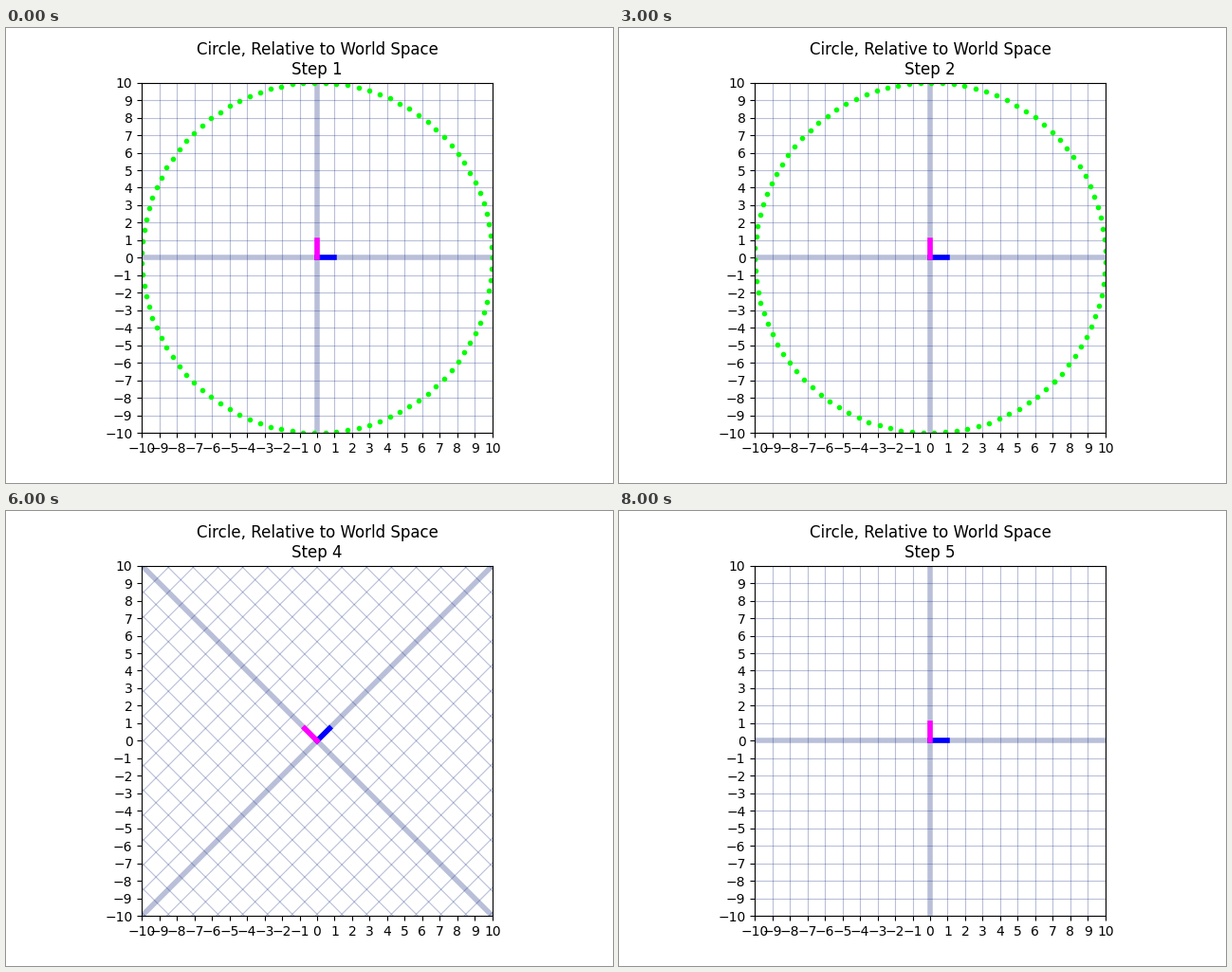
Animation, 640 px wide and 480 px high, one loop 10 s. Source, as a matplotlib script:

```python
import numpy as np
import matplotlib.pyplot as plt
from matplotlib.animation import FuncAnimation

LIMIT = 10
REACH = 30          # half length of the grid lines
COUNT = 15          # grid lines on each side of an axis
GRID = (0.09, 0.18, 0.50)


def rotation(degrees):
    a = np.radians(degrees)
    return np.array([[np.cos(a), -np.sin(a)], [np.sin(a), np.cos(a)]])


WORLD = np.eye(2)
TURN = rotation(-45)
SCALE = np.diag([4.0, 2.0])
TURN_BACK = rotation(45)

# One entry per second: step number, basis on show, map applied to the circle
TIMELINE = (
    [(1, WORLD, WORLD)] * 2
    + [(2, TURN, TURN), (2, WORLD, TURN)]
    + [(3, SCALE, SCALE @ TURN), (3, WORLD, SCALE @ TURN)]
    + [(4, TURN_BACK, TURN_BACK @ SCALE @ TURN),
       (4, WORLD, TURN_BACK @ SCALE @ TURN)]
    + [(5, WORLD, TURN_BACK @ SCALE @ TURN)] * 2
)

angles = np.linspace(0, 2 * np.pi, 100)
circle = LIMIT * np.array([np.cos(angles), np.sin(angles)])

fig, ax = plt.subplots(figsize=(6.4, 4.8), dpi=100)
ax.set_aspect("equal")
ax.set_xlim(-LIMIT, LIMIT)
ax.set_ylim(-LIMIT, LIMIT)
ax.set_xticks(range(-LIMIT, LIMIT + 1))
ax.set_yticks(range(-LIMIT, LIMIT + 1))
title = ax.set_title("Circle, Relative to World Space\nStep 1")

segments = []       # (line, end points in the moving basis)


def add_segment(xs, ys, **style):
    line, = ax.plot(xs, ys, **style)
    segments.append((line, np.array([xs, ys], dtype=float)))


for k in range(-COUNT, COUNT + 1):
    width = 4 if k == 0 else 0.8
    add_segment([k, k], [-REACH, REACH], color=GRID, alpha=0.3, lw=width)
    add_segment([-REACH, REACH], [k, k], color=GRID, alpha=0.3, lw=width)
add_segment([0, 1], [0, 0], color="#0000ff", lw=4)
add_segment([0, 0], [0, 1], color="#ff00ff", lw=4)
dots, = ax.plot(*circle, ".", color="#00ff00", ms=6)


def draw(i):
    step, basis, shape = TIMELINE[i]
    for line, ends in segments:
        line.set_data(*(basis @ ends))
    dots.set_data(*(shape @ circle))
    title.set_text(f"Circle, Relative to World Space\nStep {step}")


anim = FuncAnimation(fig, draw, frames=len(TIMELINE), interval=1000,
                     repeat=True, repeat_delay=0)
plt.show()
```
